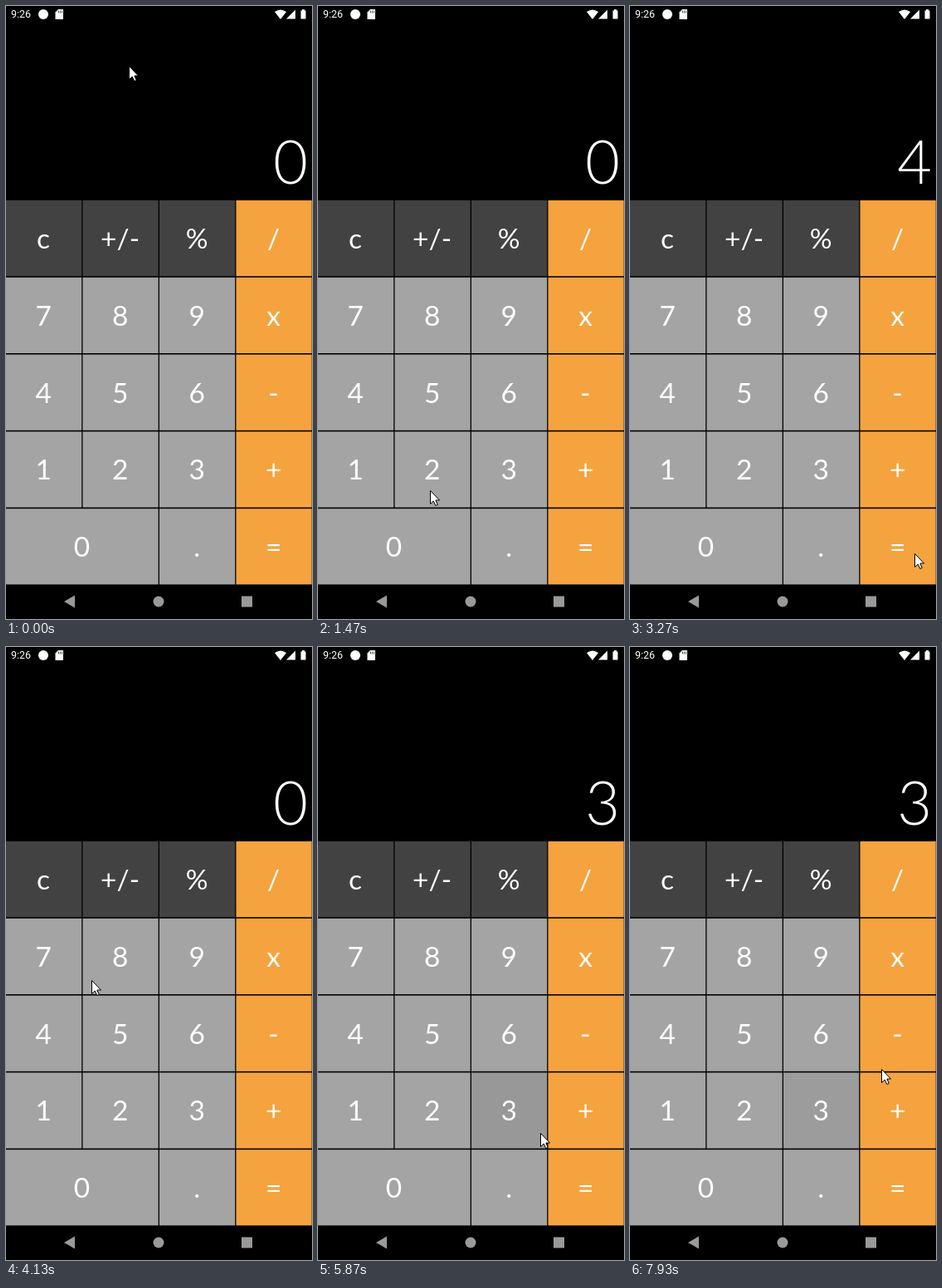
An HTML page for the animation above (8000 ms loop, 369x738 px).

```html
<!DOCTYPE html>
<html lang="en">
<head>
<meta charset="utf-8">
<title>Calculator</title>
<style>
  html, body { margin: 0; width: 100%; height: 100%; overflow: hidden; background: #000; }
  svg { display: block; width: 369px; height: 738px; }
  text { fill: #fff; font-family: Lato, sans-serif; }
  .key { font-size: 33.5px; text-anchor: middle; }
  #display { font-size: 72px; font-weight: 300; text-anchor: end; }
  #clock { font: 12.5px Roboto, sans-serif; }
</style>
</head>
<body>
<svg viewBox="0 0 369 738">
  <rect width="369" height="738"/>
  <text id="clock" x="6" y="14">9:26</text>
  <g fill="#fff">
    <circle cx="45" cy="10" r="6"/>
    <path d="M63 4h6v12h-9.500v-8.500z"/>
    <path d="M324 7q7-5 14 0l-7 9z"/>
    <path d="M349 4.500v11h-11z"/>
    <path d="M355.500 5.500h1.500v-1.500h3v1.500h1.500v10h-6z"/>
  </g>
  <path d="M63.500 5.500v3M65.500 5.500v3M67.500 5.500v3" stroke="#000" stroke-width=".7"/>
  <text id="display" x="364" y="214"></text>
  <g id="keys"></g>
  <g fill="#999">
    <path d="M70 717l13-7.500v15z"/>
    <circle cx="184" cy="717" r="6.500"/>
    <rect x="284" y="710.500" width="13" height="13"/>
  </g>
  <path id="cursor" d="M.5.500V16.500L4.200 13 6.800 18.500 9.300 17.400 6.900 12H11.500z" fill="#fff" stroke="#000"/>
</svg>
<script>
const LOOP = 8000, STEP = 1000 / 15;
const COL = 92.5, ROW = 92.8, TOP = 234, SIZE = 91.2;
const RESPONSE = 200, FADE = 267;
const $ = id => document.getElementById(id);

function add(tag, attrs, text = '') {
  const el = document.createElementNS('http://www.w3.org/2000/svg', tag);
  for (const name in attrs) el.setAttribute(name, attrs[name]);
  el.textContent = text;
  return $('keys').appendChild(el);
}

// Each key is a face, a shade for its press, and a label; zero spans two columns.
const shades = {};
const rows = [['c', '+/-', '%', '/'], ['7', '8', '9', 'x'], ['4', '5', '6', '-'], ['1', '2', '3', '+'], ['0', '', '.', '=']];
rows.forEach((row, r) => row.forEach((label, c) => {
  if (!label) return;
  const x = c * COL, y = TOP + r * ROW;
  const width = SIZE + (label === '0' ? COL : 0);
  const box = { x, y, width, height: SIZE };
  add('rect', { ...box, fill: c === 3 ? '#f5a33f' : r ? '#a4a4a4' : '#424242' });
  shades[label] = label === '+'
    ? add('circle', { cx: 320, cy: 556 })
    : add('rect', box);
  add('text', { class: 'key', x: x + width / 2 - .5, y: y + 58 }, label);
}));

// Where the pointer rests, until when, and which key it taps there
const stop = (arrive, leave, x, y, key) => ({ arrive, leave, x, y, key });
const stops = [
  stop(0, 267, 148, 72),
  stop(667, 800, 142, 359),
  stop(1333, 1333, 48, 572, '1'),
  stop(1467, 1467, 135, 583),
  stop(1933, 2133, 321, 590, '+'),
  stop(2400, 2533, 242, 565, '3'),
  stop(2933, 3267, 343, 659, '='),
  stop(3667, 4000, 77, 288, 'c'),
  stop(4333, 4533, 142, 571, '2'),
  stop(4933, 5400, 310, 558, '+'),
  stop(5600, 5733, 239, 556, '3'),
  stop(6133, 6200, 325, 644, '='),
  stop(6733, 6867, 49, 274, 'c'),
  stop(7333, 7400, 170, 560),
  stop(7600, 7733, 235, 558, '3'),
  stop(7933, LOOP, 303, 508)
];
const taps = stops.filter(s => s.key);

function pointerAt(t) {
  const i = stops.findLastIndex(s => s.arrive <= t + 1);
  const from = stops[i], to = stops[i + 1] || from;
  const k = Math.max(0, (t - from.leave) / (to.arrive - from.leave)) || 0;
  return [from.x + (to.x - from.x) * k, from.y + (to.y - from.y) * k].map(Math.round);
}

// Works the calculator through the keys tapped so far.
function calculate(keys) {
  let sum = 0, shown = 0;
  for (const key of keys) {
    if (key === 'c') sum = shown = 0;
    else if (key === '+') [sum, shown] = [sum + shown, 0];
    else if (key === '=') [sum, shown] = [0, sum + shown];
    else shown = shown * 10 + Number(key);
  }
  return shown;
}

function draw(now) {
  // The screen refreshes in whole steps.
  const t = Math.floor((now % LOOP + 4) / STEP) * STEP % LOOP;
  const done = taps.filter(s => s.arrive + RESPONSE <= t + 1);
  $('cursor').setAttribute('transform', `translate(${pointerAt(t)})`);
  $('display').textContent = calculate(done.map(s => s.key));

  for (const key in shades) shades[key].setAttribute('opacity', 0);
  const last = done.at(-1);
  if (!last || last.key === '=') return;
  const age = t - last.arrive - RESPONSE;
  const left = Math.max(0, 1 - age / FADE);
  const shade = shades[last.key];
  shade.setAttribute('opacity', .1 * (last.key === '+' ? Math.min(1, left * 1.4) : left));
  shade.setAttribute('r', Math.min(43, 20 + age * .35));
}

function tick() {
  draw(performance.now());
  requestAnimationFrame(tick);
}
tick();
</script>
</body>
</html>
```
